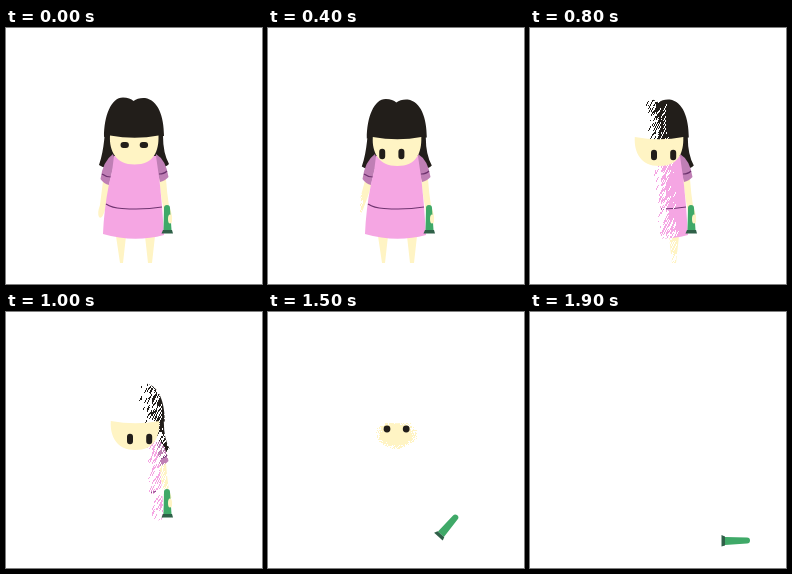
An HTML page with a canvas that plays this animation: 256x256 px, repeating every 2000 ms.

```html
<!DOCTYPE html>
<html lang="en">
<head>
<meta charset="utf-8">
<title>Fading girl</title>
<style>
  html, body { margin: 0; width: 100%; height: 100%; overflow: hidden; background: #fff; }
  canvas { display: block; width: 100vw; height: 100vh; }
</style>
</head>
<body>
<canvas id="stage" width="256" height="256"></canvas>
<script>
const SIZE = 256, STEP_MS = 100, STEPS = 20;
const stage = document.getElementById('stage').getContext('2d');
const layer = () => Object.assign(document.createElement('canvas'), { width: SIZE, height: SIZE }).getContext('2d');
const bodyLayer = layer(), faceLayer = layer();

const SKIN = '#fff4c4', HAIR = '#221e1a', PINK = '#f5a6e3', SLEEVE = '#bf7fb5', SEAM = '#6f3470';
const shape = {
  backHair: new Path2D('M101 90C98 105 99 120 93 137Q98 141 106 139L152 139Q159 140 163 136Q157 125 157 108L155 90Z'),
  hair: new Path2D('M98 109C98 88 105 69.5 117 69.5Q124 69.5 127.5 73Q132 69.5 139 70C152 72 158 88 158 108Q130 111 104 108Z'),
  face: new Path2D('M104 107.5Q129 112 152.5 107.5C153 123 148 136.5 128.5 136.5C110 136.5 103 123 104 107.5Z'),
  dress: new Path2D('M108 128L150 128Q154 152 156 178L158 207Q128 215 97 206Q98 181 103 156Q107 142 108 128Z'),
  hem: new Path2D('M100 176Q106 180 116 180.5Q138 182 156 179'),
  leftSleeve: new Path2D('M107 126Q97 133 94.5 151Q98 156 103 157L109 132Z'),
  rightSleeve: new Path2D('M150 126Q160 132 162.5 149Q159 153 154 154L149 136Z'),
  cuffs: new Path2D('M96 146Q100 149 105 149M153 146Q158 146 161 143'),
  leftArm: new Path2D('M97 153L104 156Q102 170 99 182Q96 192 93 189Q91 185 94 177Z'),
  rightArm: new Path2D('M153 151L160 151Q161 166 163 178Q168 190 165 196Q161 199 159 190Q155 170 153 151Z'),
  legs: new Path2D('M110 208L120 208L117 235L114 235ZM139 208L149 208L146 235L142 235Z'),
  bottle: new Path2D('M-3 -11Q-3 -14 0 -14Q3 -14 3 -11L4.5 11L-3.5 11Z'),
  base: new Path2D('M-4 11L5 11L6 14.5L-5.5 14.5Z')
};

// Progress from 0 to 1 between two steps.
const ramp = (step, from, to) => Math.min(1, Math.max(0, (step - from) / (to - from)));

function noise(x, y) {
  const n = Math.sin(x * 12.9898 + y * 78.233) * 43758.5453;
  return n - Math.floor(n);
}

function fill(ctx, color, path) {
  ctx.fillStyle = color;
  ctx.fill(path);
}

function line(ctx, color, path) {
  ctx.strokeStyle = color;
  ctx.lineWidth = 1.2;
  ctx.stroke(path);
}

function placed(ctx, x, y, degrees, draw) {
  ctx.save();
  ctx.translate(x, y);
  ctx.rotate(degrees * Math.PI / 180);
  draw();
  ctx.restore();
}

// Erases thin slanted flecks along a front that sweeps to the right.
function sweepAway(ctx, step) {
  const front = 82 + (step - 4) * 10.8;
  const spread = 3 + (step - 4) * 2.2;
  for (let y = 60; y < 240; y++) {
    const edge = front + (y - 70) * .1;
    const solid = Math.floor(edge - spread);
    ctx.clearRect(0, y, solid, 1);
    for (let x = solid; x < edge + spread; x++) {
      const column = Math.floor(x + y * .5);
      const grain = noise(column, Math.floor((y + column * 3) / 5)) * 2 - 1;
      if (x + grain * spread < edge) ctx.clearRect(x, y, 1, 1);
    }
  }
}

// Crumbles the face from its rim toward the centre.
function crumble(ctx, step) {
  const limit = 1.15 - 1.3 * ramp(step, 12, 18) ** 1.7;
  for (let y = 106; y < 140; y++) {
    for (let x = 103; x < 155; x++) {
      const radius = Math.hypot((x - 128) / 24, (y - 122) / 17);
      if (radius + (noise(x, y) - .5) * .3 > limit) ctx.clearRect(x, y, 1, 1);
    }
  }
}

function drawBody(step, dx, dy) {
  const ctx = bodyLayer;
  ctx.clearRect(0, 0, SIZE, SIZE);
  placed(ctx, dx, dy, 0, () => fill(ctx, HAIR, shape.backHair));
  placed(ctx, 100, 153, 8 * ramp(step, 0, 3), () => {
    ctx.translate(-100, -153);
    fill(ctx, SKIN, shape.leftArm);
  });
  fill(ctx, SKIN, shape.rightArm);
  fill(ctx, SKIN, shape.legs);
  fill(ctx, SLEEVE, shape.leftSleeve);
  fill(ctx, SLEEVE, shape.rightSleeve);
  line(ctx, SEAM, shape.cuffs);
  fill(ctx, PINK, shape.dress);
  line(ctx, SEAM, shape.hem);
  placed(ctx, dx, dy, 0, () => fill(ctx, HAIR, shape.hair));
  if (step >= 4) sweepAway(ctx, step);
}

function drawFace(step, dx, dy) {
  faceLayer.clearRect(0, 0, SIZE, SIZE);
  placed(faceLayer, dx, dy, 0, () => fill(faceLayer, SKIN, shape.face));
  if (step > 12) crumble(faceLayer, step);
}

// The gaze goes down left, then right, then back up through a blink.
function drawEyes(step) {
  const left = ramp(step, 1, 4), right = ramp(step, 6, 8), back = ramp(step, 10, 15);
  const widen = ramp(step, 0, 4), calm = ramp(step, 12, 15);
  const blink = Math.max(0, 1 - Math.abs(step - 12) / 2);
  const x = 118.7 - 4.5 * left + 9.8 * right - 5 * back;
  const y = 117 + 9 * left + right - 10 * back;
  const rx = 4.2 - 1.2 * widen + .4 * calm + blink - 2.8 * ramp(step, 16, 18);
  const ry = (3 + 2.3 * widen - 1.9 * calm) * (1 - .8 * blink);
  stage.fillStyle = HAIR;
  stage.beginPath();
  for (const cx of [x, x + 19.2]) {
    stage.roundRect(cx - rx, y - ry, rx * 2, ry * 2, blink === 1 ? 0 : Math.min(rx, ry));
  }
  stage.fill();
}

function drawBottle(step) {
  const slip = ramp(step, 10, 12), tip = ramp(step, 12, 18);
  placed(stage, 161 + 45 * tip ** 1.25, 191 + 8 * slip + 29.5 * tip, 90 * tip ** 1.1, () => {
    fill(stage, '#3fa968', shape.bottle);
    fill(stage, '#2f6048', shape.base);
  });
  if (step < 11) {
    stage.fillStyle = SKIN;
    stage.beginPath();
    stage.ellipse(164, 191, 2, 4.5, 0, 0, Math.PI * 2);
    stage.fill();
  }
}

function render(step) {
  const nod = ramp(step, 0, 3), dx = .8 * nod, dy = 1.5 * nod;
  stage.fillStyle = '#fff';
  stage.fillRect(0, 0, SIZE, SIZE);
  if (step < 12) {
    drawBody(step, dx, dy);
    stage.drawImage(bodyLayer.canvas, 0, 0);
  }
  if (step < 18) {
    drawFace(step, dx, dy);
    stage.drawImage(faceLayer.canvas, 0, 0);
  }
  if (step < 19) drawEyes(step);
  drawBottle(step);
}

const start = performance.now();
let shown = -1;
function tick() {
  const step = Math.floor((performance.now() - start) / STEP_MS) % STEPS;
  if (step !== shown) render(shown = step);
  requestAnimationFrame(tick);
}
tick();
</script>
</body>
</html>
```
